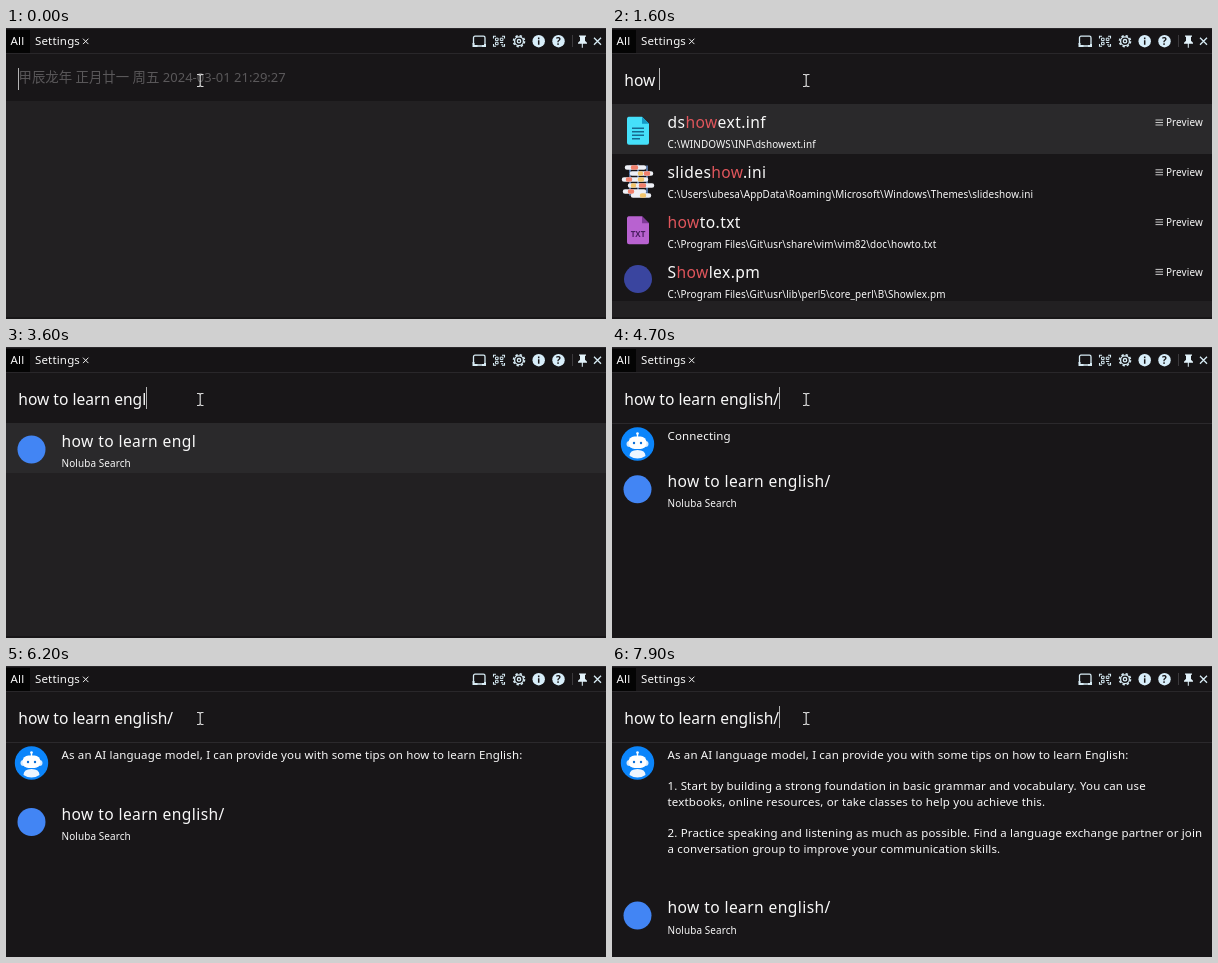
These frames come from a looping animation (600x291 px, 8000 ms). An HTML page:

```html
<!DOCTYPE html>
<html lang="en">
<head>
<meta charset="utf-8">
<title>Launcher search</title>
<style>
  html, body { margin: 0; width: 100%; height: 100%; overflow: hidden; background: #181618; }
  svg { display: block; width: 100%; height: 100%; }
  text { white-space: pre; fill: #f8f8f8; font-family: "Noto Sans", "Open Sans", "Noto Sans CJK SC", "Noto Sans CJK", sans-serif; }
  .input { font-size: 15.6px; }
  .title { font-size: 15.6px; letter-spacing: .4px; }
  .small { font-size: 9.95px; letter-spacing: .1px; }
  .body { font-size: 11.5px; letter-spacing: .16px; }
  .hint, .hint tspan { fill: #5a585a; }
  .hit { fill: #e0565c; }
  .line { fill: none; stroke: #d8ecf5; stroke-width: 1.3; }
</style>
</head>
<body>
<svg viewBox="0 0 600 291" preserveAspectRatio="none">
  <defs>
    <path id="doc" d="M-9.500-14H4l7 7V12a2 2 0 0 1-2 2H-9a2 2 0 0 1-2-2V-12a2 2 0 0 1 1.500-2z"/>
    <g id="inf">
      <use href="#doc" fill="#45e0fa"/>
      <path d="M4-14l7 7H4z" fill="#1599c5"/>
      <path d="M-6-2.500H6M-6 1H6M-6 4.500H6M-6 8H2" stroke="#17698f" stroke-width="1.5"/>
    </g>
    <g id="ini">
      <path d="M-8-15v30M0-16v32M9-15v30" stroke="#56739f" stroke-width="2"/>
      <g stroke-width="4.500" stroke-linecap="round">
        <path d="M-11-13H6M-6-7H13M-14-1H8M-8 5H14M-13 11H6M-5 15H11" stroke="#eef0f6"/>
        <path d="M-5-13h3M8-7h2M-10-1h2M3 5h3M-8 11h2" stroke="#f0806c"/>
        <path d="M2-7h1M2-1h2M-5 5h1M4 15h2" stroke="#f2c56c"/>
      </g>
    </g>
    <g id="txt">
      <use href="#doc" fill="#b862d0"/>
      <path d="M4-14l7 7H4z" fill="#7f3a98"/>
      <text y="6.500" text-anchor="middle" font-size="8" font-weight="600" style="fill:#4a1d60">TXT</text>
    </g>
    <circle id="pm" r="14" cy="-1" fill="#3a459f"/>
    <circle id="web" r="14" fill="#4285f4"/>
    <g id="bot">
      <circle r="16.700" fill="#0b85fb"/>
      <path d="M0-11v5" stroke="#fff" stroke-width="1.4"/><circle cy="-10.500" r="1.300" fill="#fff"/>
      <rect x="-11" y="-3" width="22" height="6" rx="3" fill="#d4eaff"/>
      <rect x="-9" y="-7.500" width="18" height="12.500" rx="6" fill="#fff"/>
      <path d="M-8 12q0-6 8-6t8 6q-8 5-16 0z" fill="#eef6ff"/>
      <circle cx="-3.500" cy="-1" r="1.200" fill="#0b6fd8"/><circle cx="3.500" cy="-1" r="1.200" fill="#0b6fd8"/>
    </g>
  </defs>

  <rect width="600" height="291" fill="#181618"/>
  <g id="panel"></g>

  <rect width="600" height="26" fill="#161416"/>
  <path d="M0 .5H600M0 25.500H600" stroke="#29272a"/>
  <rect y="2" width="24" height="23" fill="#040404"/>
  <text class="body" x="4.500" y="17.300">All</text>
  <text class="body" x="29" y="17.300">Settings</text>
  <path d="M77 10.700l5.400 5.400m0-5.400l-5.400 5.400" stroke="#eee"/>

  <g class="line">
    <rect x="467.500" y="8.200" width="11.500" height="9.800" rx="1.500"/>
    <path d="M467.500 15v3h4M476 18h3v-2" stroke-width="2"/>
    <path d="M487.500 10.500V8.200h2.500M496 8.200h2.500v2.300M498.500 16v2.300h-2.500M490 18.300h-2.500V16" stroke-width="1.100"/>
    <path d="M489.500 10.200h2.600v2.400h-2.600zM494.300 10.200h2.600v2.400h-2.600zM489.500 14.300h2.600v2.400h-2.600zM494 14.500h3.200M495 16.800h2.200" stroke-width="1"/>
    <circle cx="513" cy="13.200" r="4.400"/><circle cx="513" cy="13.200" r="1.700"/>
    <circle cx="513" cy="13.200" r="5.500" stroke-dasharray="2.300 2.020" stroke-width="1.600"/>
  </g>
  <circle cx="532.700" cy="13.200" r="6.200" fill="#d8eefa"/>
  <path d="M532.700 9.500v1.700M532.700 12.300v4.500" stroke="#181618" stroke-width="1.5"/>
  <circle cx="552.500" cy="13.200" r="6.200" fill="#d8eefa"/>
  <text x="552.500" y="16.800" text-anchor="middle" font-size="10" font-weight="700" style="fill:#181618">?</text>
  <path d="M566.500 7v12" stroke="#3b393c"/>
  <path d="M573 7.500h7v1.300h-1v4l2 2v1h-4.200v4h-1v-4H572v-1l2-2v-4h-1z" fill="#e2f2fa"/>
  <path d="M588 9.700l7 7m0-7l-7 7" stroke="#d8ecf5" stroke-width="1.3"/>

  <text class="hint" x="12.500" y="54" font-size="13.400">甲辰龙年 正月廿一 周五 <tspan id="clock" font-size="13"></tspan></text>
  <text class="input" id="input" x="12.300" y="57.500"></text>
  <path id="caret" d="M.5 40v22" stroke="#b4b4b4"/>
  <path d="M191 46.500h2.200l1 1 1-1h2.300M194.200 47.500v10.500M191 58.500h2.200l1-1 1 1h2.300" fill="none" stroke="#d8d8d8" stroke-width="1.2"/>
</svg>

<script>
const LOOP = 8000;
const $ = id => document.getElementById(id);

const phrase = "how to learn english/";
const typed = [
  [0, 0], [900, 1], [1200, 2], [1300, 3], [1600, 4], [1800, 5], [1900, 6], [2100, 7], [2200, 8],
  [2400, 10], [2600, 11], [2800, 12], [3100, 13], [3300, 14], [3400, 15], [3500, 16], [3600, 17],
  [3800, 18], [3900, 20], [4700, 21]
];
const searched = [
  [1900, 6], [2200, 8], [2400, 10], [2800, 12], [3400, 15], [3600, 17], [3800, 18], [3900, 20], [4700, 21]
];

const answer = `As an AI language model, I can provide you with some tips on how to learn English:

1. Start by building a strong foundation in basic grammar and vocabulary. You can use
textbooks, online resources, or take classes to help you achieve this.

2. Practice speaking and listening as much as possible. Find a language exchange partner or join
a conversation group to improve your communication skills.

`;
// Each streamed part ends with these words.
const streamed = [
  [5100, "As an"], [5200, "language"], [5300, "I can"], [5400, "provide you"], [5600, "you with"],
  [5700, "tips on"], [5800, "to learn"], [5900, "English:\n\n"], [6300, "foundation"], [6400, "You"],
  [7100, "or take"], [7200, "speaking and"], [7400, "possible."], [7900, "skills.\n\n"]
];

const files = [
  ["inf", "dshowext.inf", "C:\\WINDOWS\\INF\\dshowext.inf"],
  ["ini", "slideshow.ini", "C:\\Users\\ubesa\\AppData\\Roaming\\Microsoft\\Windows\\Themes\\slideshow.ini"],
  ["txt", "howto.txt", "C:\\Program Files\\Git\\usr\\share\\vim\\vim82\\doc\\howto.txt"],
  ["pm", "Showlex.pm", "C:\\Program Files\\Git\\usr\\lib\\perl5\\core_perl\\B\\Showlex.pm"]
];

const latest = (steps, t) => steps.filter(s => s[0] <= t).pop();
const rect = (y, h, fill) => `<rect y="${y}" width="600" height="${h}" fill="${fill}"/>`;
const label = (cls, x, y, s) => `<text class="${cls}" x="${x}" y="${y}">${s}</text>`;
const icon = (id, x, y) => `<use href="#${id}" x="${x}" y="${y}"/>`;
const gray = top => rect(top, 289 - top, "#222022");
const selection = rect(76, 50, "#2a292b");

function highlight(name, query) {
  const i = name.indexOf(query);
  const end = i + query.length;
  return `${name.slice(0, i)}<tspan class="hit">${name.slice(i, end)}</tspan>${name.slice(end)}`;
}

function fileRow([id, name, path], index, query) {
  const y = 49.8 * index;
  return icon(id, 26, 102.7 + y) + label("title", 55.5, 100.2 + y, highlight(name, query)) +
    label("small", 55.5, 120.3 + y, path) + label("small", 554, 98.2 + y, "Preview") +
    `<path d="M543.500 ${92 + y}h7.500m-7.500 2.500h7.500m-7.500 2.500h7.500" stroke="#dcdcdc" stroke-width=".9"/>`;
}

const webRow = (y, title) => icon("web", 25.5, y + 2.5) + label("title", 55.5, y, title) +
  label("small", 55.5, y + 20.4, "Noluba Search");

function answerPanel(t) {
  const part = latest(streamed, t);
  const text = part ? answer.slice(0, answer.indexOf(part[1]) + part[1].length) : "Connecting";
  const lines = text.split("\n");
  const webY = Math.max(139.8, 106.7 + 15.6 * lines.length);
  return `<path d="M0 76.500H600" stroke="#2b292c"/>` + icon("bot", 25.5, 97) +
    lines.map((s, i) => label("body", 55.5, 93 + 15.6 * i, s)).join("") + webRow(webY, phrase);
}

function panelAt(t, query) {
  const fileRows = list => list.map((f, i) => fileRow(f, i, query)).join("");
  if (t < 900) return gray(73);
  if (t < 1000) return gray(76);
  if (t < 1200) return gray(175) + selection + fileRows([files[0], files[2]]);
  if (t < 1900) return gray(273) + selection + fileRows(files);
  if (t < 4700) return gray(125) + selection + webRow(100, phrase.slice(0, latest(searched, t)[1]));
  return answerPanel(t);
}

let shown = "";

function render(t) {
  const [keyTime, count] = latest(typed, t);
  const text = phrase.slice(0, count);
  const panel = panelAt(t, text.trim().slice(0, 3));
  if (panel !== shown) $("panel").innerHTML = shown = panel;

  $("clock").textContent = t < 100 ? "2024-03-01 21:29:27" : "2024-03-01 21:29:28";
  $("clock").parentNode.style.display = count ? "none" : "";

  const input = $("input");
  if (input.textContent !== text) input.textContent = text;
  const caretX = count ? Math.floor(12.6 + input.getComputedTextLength()) : 12;
  $("caret").setAttribute("transform", `translate(${caretX})`);
  const idle = Math.max(0, t - Math.max(keyTime, 100));
  $("caret").style.display = idle % 1000 < 500 ? "" : "none";
}

const start = performance.now();
function tick() {
  render((performance.now() - start) % LOOP);
  requestAnimationFrame(tick);
}
tick();
</script>
</body>
</html>
```
